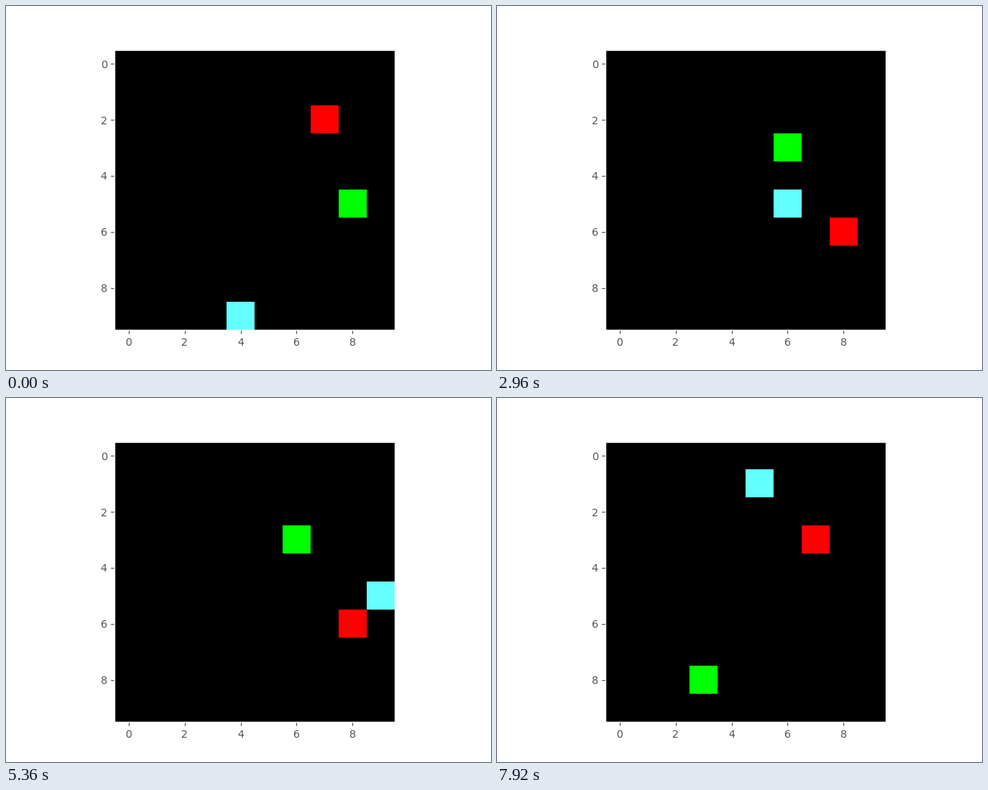
A matplotlib script that plays this animation: 640 by 480 pixels, repeating every 8 s.

```python
import numpy as np
import matplotlib.pyplot as plt
from matplotlib.animation import FuncAnimation

SIZE = 10
FOOD, ENEMY, PLAYER = (0, 255, 0), (255, 0, 0), (100, 255, 255)
# Diagonal moves as (dx, dy); rows grow downwards.
MOVES = {"q": (-1, -1), "e": (1, -1), "z": (-1, 1), "c": (1, 1)}

# Each episode: food, enemy, player start, moves.
EPISODES = [
    ((8, 5), (7, 2), (4, 9), "eeee"),
    ((3, 6), (9, 3), (4, 5), "z"),
    ((4, 0), (6, 1), (7, 4), "qqqeq"),
    ((6, 9), (8, 1), (9, 3), "ec" * 4 + "zzczzcz"),
    ((6, 3), (8, 6), (2, 3),
     "zcccz" + "e" * 6 + "cqzqzqczqeeqcecccccc" + "ec" * 11 + "ceecqqq"),
    ((3, 8), (7, 3), (8, 3), "qqqzezeqc"),
]


def walk(start, moves):
    """Yield every position of a walk that is clamped to the board."""
    pos = np.array(start)
    yield tuple(pos)
    for key in moves:
        pos = np.clip(pos + MOVES[key], 0, SIZE - 1)
        yield tuple(pos)


STATES = [(food, enemy, player)
          for food, enemy, start, moves in EPISODES
          for player in walk(start, moves)]


def board(frame):
    food, enemy, player = STATES[frame]
    grid = np.zeros((SIZE, SIZE, 3), dtype=np.uint8)
    for (x, y), color in ((food, FOOD), (player, PLAYER), (enemy, ENEMY)):
        grid[y, x] = color
    return grid


plt.rcParams.update({
    "font.family": "DejaVu Sans",
    "font.size": 10,
    "axes.edgecolor": "white",
    "axes.linewidth": 1,
    "xtick.color": "#555555",
    "ytick.color": "#555555",
})

fig, ax = plt.subplots(figsize=(6.4, 4.8), dpi=100)
image = ax.imshow(board(0), interpolation="nearest")
ax.set_xticks(range(0, SIZE, 2))
ax.set_yticks(range(0, SIZE, 2))


def update(frame):
    image.set_data(board(frame))
    return [image]


anim = FuncAnimation(fig, update, frames=len(STATES), interval=80,
                     repeat=True, repeat_delay=0)
plt.show()
```
